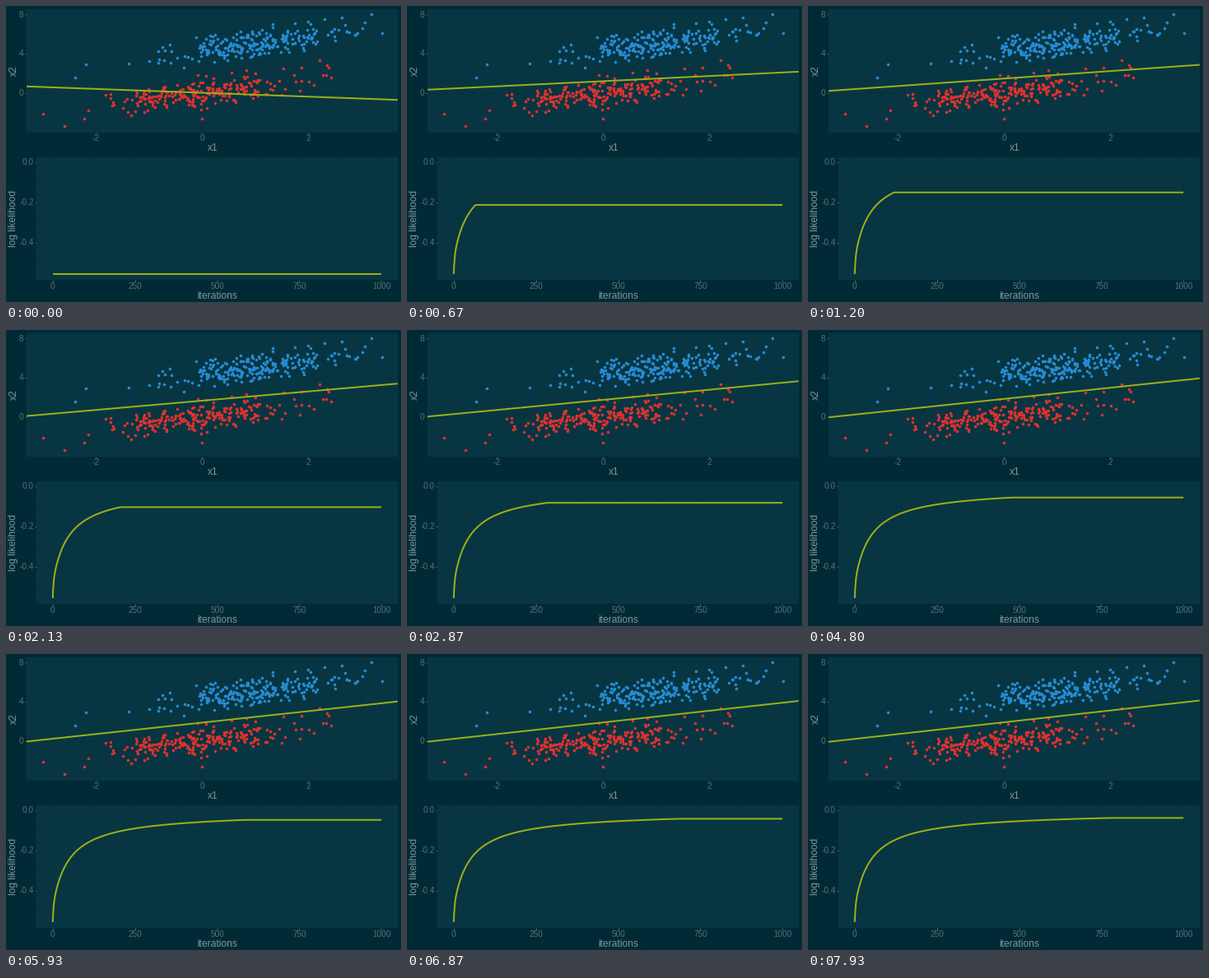
These frames come from a looping animation (480x360 px, 8000 ms). A matplotlib script:

```python
import numpy as np
import matplotlib.pyplot as plt
from matplotlib.animation import FuncAnimation
from matplotlib.patches import Rectangle

WIDTH, HEIGHT, DPI = 480, 360, 100
FRAMES, LOOP_MS = 120, 8000
ITERATIONS_PER_FRAME = 6.63
PT = 72 / DPI

BACKGROUND, PANEL, GRID = "#002b36", "#073642", "#04323d"
TICK, TITLE = "#586e75", "#839496"
RED, BLUE, YELLOW = "#dc322f", "#268bd2", "#9caf1a"

plt.rcParams["font.family"] = "Liberation Sans"
fig = plt.figure(figsize=(WIDTH / DPI, HEIGHT / DPI), dpi=DPI, facecolor=BACKGROUND)
ax = fig.add_axes([0, 0, 1, 1])
ax.set_xlim(0, WIDTH)
ax.set_ylim(HEIGHT, 0)
ax.axis("off")


def linear(origin, scale):
    """Map data values to pixel positions."""
    return lambda value: origin + scale * np.asarray(value)


x1_px, x2_px = linear(238.2, 64.4), linear(105.6, -11.9)
iteration_px, likelihood_px = linear(56.8, 0.3995), linear(190, -245)


def label(x, y, text, size, color, ha="center", rotation=0):
    ax.text(x, y, text, fontsize=size * PT, color=color, ha=ha, va="baseline",
            rotation=rotation, rotation_mode="anchor")


def segment(xs, ys, color, width):
    ax.plot(xs, ys, color=color, lw=width * PT, solid_capstyle="butt", zorder=1)


def panel(left, top, right, bottom, x_px, y_px, x_ticks, y_ticks, x_title, y_title,
          y_format="{}"):
    """Draw a plot panel with major grid lines at the ticks and minor ones between."""
    ax.add_patch(Rectangle((left, top), right - left, bottom - top,
                           facecolor=PANEL, lw=0, zorder=0))
    x_half, y_half = (x_ticks[1] - x_ticks[0]) / 2, (y_ticks[1] - y_ticks[0]) / 2
    for value in x_ticks:
        x = x_px(value)
        segment([x, x], [top, bottom], GRID, 1)
        segment([x_px(value + x_half)] * 2, [top, bottom], GRID, 0.5)
        segment([x, x], [bottom, bottom + 2.5], TICK, 0.8)
        label(x, bottom + 11, f"{value}", 10, TICK)
    for value in y_ticks:
        y = y_px(value)
        segment([left, right], [y, y], GRID, 1)
        segment([left, right], [y_px(value + y_half)] * 2, GRID, 0.5)
        segment([left - 2.5, left], [y, y], TICK, 0.8)
        label(left - 3.5, y + 3.4, y_format.format(value), 10, TICK, ha="right")
    label((left + right) / 2 + 0.3, bottom + 23, x_title, 12, TITLE)
    label(12.5, (top + bottom) / 2 - 0.4, y_title, 12, TITLE, rotation=90)


panel(25, 4, 476, 153.5, x1_px, x2_px, [-2, 0, 2], [8, 4, 0], "x1", "x2")
panel(37, 184, 476, 333, iteration_px, likelihood_px, range(0, 1001, 250),
      [0.0, -0.2, -0.4], "iterations", "log likelihood", "{:.1f}")


def cloud(rng, mean, x_range, outliers):
    """Correlated normal points within x_range, plus a few outliers."""
    points = rng.multivariate_normal(mean, [[1, 0.75], [0.75, 1]], 240)
    inside = (points[:, 0] > x_range[0]) & (points[:, 0] < x_range[1])
    return np.vstack([points[inside], outliers])


rng = np.random.default_rng(12)
red = cloud(rng, (0, 0), (-3, 2.5), [(-3, -2.1), (-2.6, -3.4), (0, -2.6), (2.35, 2.8)])
blue = cloud(rng, (1, 5), (-1.6, 3.1), [(-2.4, 1.6), (-2.2, 2.9), (3.2, 8), (3.4, 6.1)])
for color, points in ((RED, red), (BLUE, blue)):
    ax.scatter(x1_px(points[:, 0]), x2_px(points[:, 1]), s=(3.6 * PT) ** 2,
               color=color, linewidths=0, zorder=2)


def rise(t, tau):
    return 1 - np.exp(-t / tau)


def log_likelihood(t):
    """A quick first gain, then roughly hyperbolic convergence to zero."""
    return -1 / (1.8 + 0.28 * rise(t, 2.5) + 3.8 * rise(t, 245) + 0.0262 * t)


def boundary_ends(t):
    """Pixel heights where the decision boundary meets the panel's sides."""
    return [108 - 10.2 / (1 + t / 103), 52.7 + 61.5 / (1 + t / 52.5)]


iterations = np.arange(1001)
line_style = dict(color=YELLOW, lw=2 * PT, solid_capstyle="butt", zorder=3)
boundary, = ax.plot([], [], **line_style)
likelihood, = ax.plot([], [], **line_style)


def draw(frame):
    # The first two positions are each held for two frames.
    step = frame if frame >= 4 else frame // 2 * 2
    t = step * ITERATIONS_PER_FRAME
    boundary.set_data([25, 476], boundary_ends(t))
    likelihood.set_data(iteration_px(iterations),
                        likelihood_px(log_likelihood(np.minimum(iterations, t))))
    return boundary, likelihood


animation = FuncAnimation(fig, draw, frames=FRAMES, interval=LOOP_MS / FRAMES,
                          repeat=True, repeat_delay=0)
plt.show()
```
